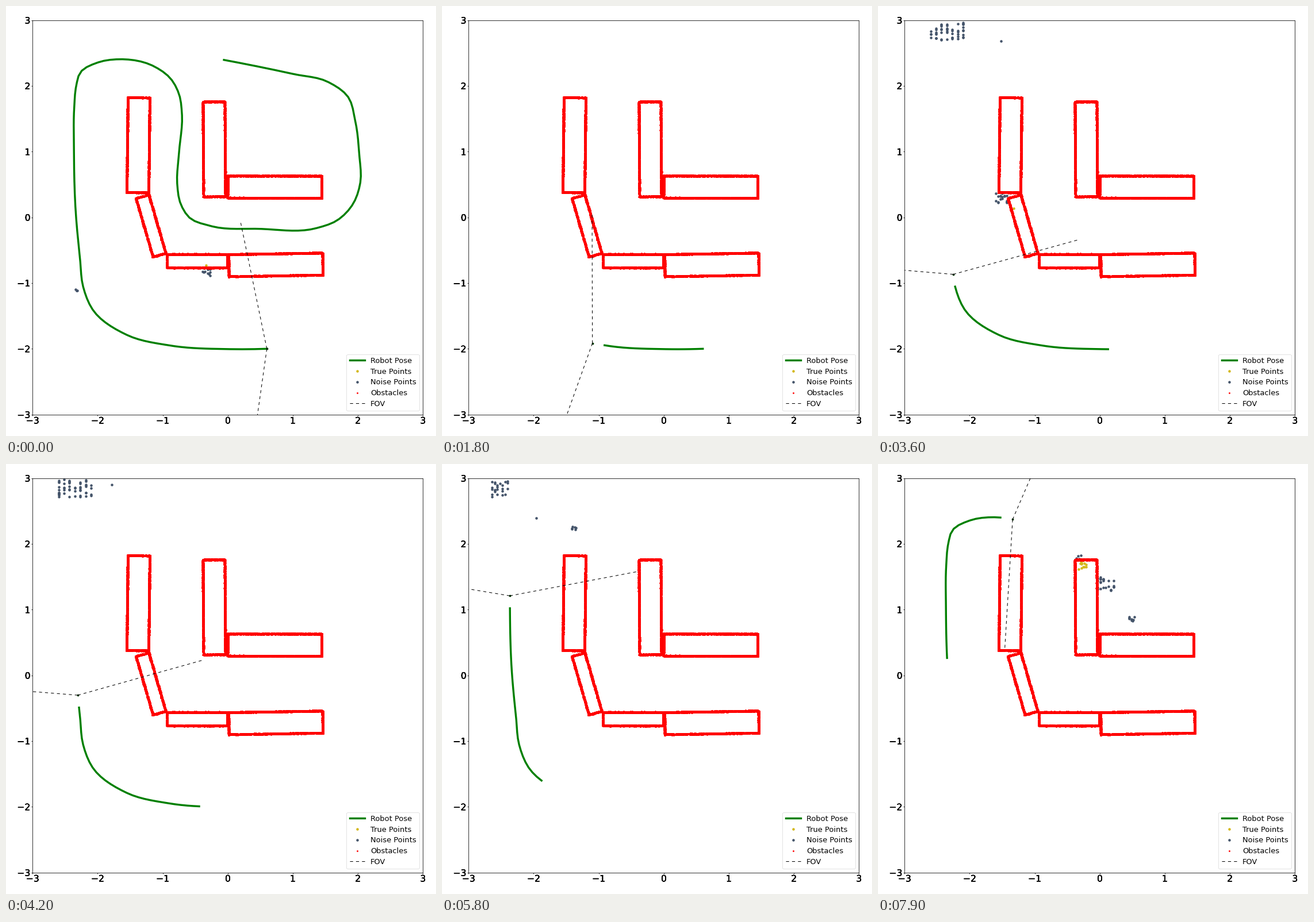
A matplotlib script that plays this animation: 748x748 px, repeating every 8000 ms.

```python
import numpy as np
import matplotlib.pyplot as plt
from matplotlib.animation import FuncAnimation
from matplotlib.patheffects import Normal

SIZE, DPI, FRAMES, STEP_MS = 748, 88, 80, 100
LEFT, RIGHT, TOP, BOTTOM = 46.3, 725.4, 24.6, 710.6
TRAIL, REACH, HALF_FOV = 31, 2.0, np.radians(80)
STRIDE = 0.0946
YELLOW, SLATE = "#d3b81a", "#44546a"

ROUTE = np.array([
    (.60, -2), (0, -2.005), (-.89, -1.95), (-1.55, -1.79), (-2.08, -1.40),
    (-2.225, -1.05), (-2.27, -.65), (-2.34, .12), (-2.365, 1.05),
    (-2.36, 1.68), (-2.33, 2), (-2.27, 2.2), (-2, 2.355), (-1.67, 2.405),
    (-1.14, 2.3), (-.87, 2.1), (-.75, 1.875), (-.705, 1.57), (-.75, .98),
    (-.777, .5), (-.725, .205), (-.59, -.005), (-.27, -.13), (.48, -.175),
    (1.36, -.165), (1.69, -.04), (1.925, .205), (2.035, .52), (2.02, .96),
    (1.96, 1.46), (1.85, 1.83), (1.54, 2.06), (1.01, 2.18), (-.06, 2.395)])

# Blocks: centre and angle of the long axis
LONG, SHORT = (1.444, .336), (.928, .205)
BLOCKS = [(LONG, -1.377, 1.101, 89.3), (LONG, -.211, 1.038, 90.35),
          (LONG, .72, .463, -.1), (LONG, .735, -.72, .95),
          (SHORT, -1.184, -.127, 106.3), (SHORT, -.472, -.664, 0)]

# Echo clusters: first step, last step, centre, radius
NOISE = [(0, 4, -.33, -.83, .06), (0, 9, -2.33, -1.1, .02),
         (20, 28, -1.6, .7, .03), (29, 42, -2.35, 2.84, .25),
         (43, 53, -2.5, 2.85, .16), (54, 64, -2.52, 2.83, .12),
         (65, 73, -2.12, 2.88, .12), (30, 41, -1.53, .28, .1),
         (43, 52, -1.62, 1.45, .05), (43, 52, -1.59, .98, .06),
         (55, 62, -1.38, 2.24, .03), (65, 74, -.64, 2.84, .07),
         (65, 74, .5, 2.78, .07), (75, 79, .09, 1.38, .12),
         (75, 79, .49, .85, .04), (75, 79, -.33, 1.79, .04)]
TRUE = [(0, 4, -.33, -.73, .005), (30, 41, -1.32, .13, .005),
        (43, 52, -1.3, 1.48, .09), (43, 52, -1.51, 1.06, .05),
        (75, 79, -.28, 1.68, .07)]


def px(v):
    """Stage pixels to points."""
    return v * 72 / DPI


def arc_length(points):
    return np.r_[0, np.cumsum(np.hypot(*np.diff(points, axis=0).T))]


def smooth(points, n=30):
    """Cubic Hermite curve through the points."""
    t = arc_length(points)
    slope = np.gradient(points, t, axis=0, edge_order=2)
    u = np.linspace(0, 1, n, endpoint=False)[:, None]
    parts = []
    for k, h in enumerate(np.diff(t)):
        parts.append((1 + 2 * u) * (1 - u) ** 2 * points[k]
                     + u * (1 - u) ** 2 * h * slope[k]
                     + u * u * (3 - 2 * u) * points[k + 1]
                     + u * u * (u - 1) * h * slope[k + 1])
    return np.vstack(parts + [points[-1:]])


def drive():
    """Poses at constant speed and their headings."""
    curve = smooth(ROUTE)
    s = arc_length(curve)
    at = np.arange(0, s[-1] + 2 * STRIDE, STRIDE)
    poses = np.column_stack([np.interp(at, s, axis) for axis in curve.T])
    dx, dy = np.gradient(poses, axis=0).T
    return poses, np.arctan2(dy, dx)


def block_dots():
    rng = np.random.default_rng(3)
    outline = np.array([(-1, -1), (1, -1), (1, 1), (-1, 1), (-1, -1)]) / 2
    dots = []
    for size, x, y, angle in BLOCKS:
        c, s = np.cos(np.radians(angle)), np.sin(np.radians(angle))
        corners = outline * size @ np.array([(c, s), (-s, c)]) + (x, y)
        for a, b in zip(corners, corners[1:]):
            t = np.linspace(0, 1, int(np.hypot(*(b - a)) * 900))[:, None]
            dots.append(a + (b - a) * t
                        + rng.uniform(-.0115, .0115, (len(t), 2)))
    return np.vstack(dots)


def echoes(clusters, step, rng):
    """Small columns of dots around every cluster seen at this step."""
    dots = [np.empty((0, 2))]
    for first, last, x, y, r in clusters:
        if first <= step <= last:
            n = int(np.ceil(200 * r))
            height = min(r, .14)
            dots.append(np.column_stack([
                x + r * rng.integers(-3, 4, n) / 3,
                y + rng.uniform(-height, height, n)]))
    return np.vstack(dots)


def strays(step, rng):
    n = rng.integers(0, 5) if step > 28 else 0
    return np.column_stack([rng.uniform(-2.5, 2, n), rng.uniform(1.6, 3, n)])


poses, heading = drive()

fig = plt.figure(figsize=(SIZE / DPI, SIZE / DPI), dpi=DPI, facecolor="white")
ax = fig.add_axes([LEFT / SIZE, 1 - BOTTOM / SIZE,
                   (RIGHT - LEFT) / SIZE, (BOTTOM - TOP) / SIZE])
ax.set(xlim=(-3, 3), ylim=(-3, 3), xticks=range(-3, 4), yticks=range(-3, 4))
ax.tick_params(length=px(1.9), width=px(0.8), pad=px(1.9), labelsize=px(15.7))
for label in ax.get_xticklabels() + ax.get_yticklabels():
    label.set_path_effects([Normal()] * 4)
for spine in ax.spines.values():
    spine.set_linewidth(px(0.8))


def dot_layer(color, size, label=None, z=1.0):
    return ax.plot([], [], "o", color=color, ms=px(size), mew=0,
                   label=label, zorder=z)[0]


trail, = ax.plot([], [], color="green", lw=px(3.4), label="Robot Pose",
                 zorder=2)
true_dots = dot_layer(YELLOW, 4.5, "True Points")
noise_dots = dot_layer(SLATE, 4.5, "Noise Points", 1.1)
blocks = dot_layer("red", 2.9, "Obstacles", 1.2)
blocks.set_data(*block_dots().T)
fov = [ax.plot([], [], color="black", lw=px(1.04), ls=(0, (5, 5)),
               label=name, zorder=3)[0] for name in ("FOV", None)]
robot = dot_layer("#003c00", 3.8, z=2.5)

legend = ax.legend(loc="lower right", fontsize=px(13), labelspacing=0.44)
legend.get_frame().set_linewidth(px(0.7))
legend.set_zorder(5)


def update(i):
    # The slice end of -1 at the first step shows the whole route
    trail.set_data(*poses[max(0, i - TRAIL):i - 1].T)
    x, y = poses[i]
    robot.set_data([x], [y])
    for line, side in zip(fov, (-HALF_FOV, HALF_FOV)):
        a = heading[i] + side
        line.set_data([x, x + REACH * np.cos(a)], [y, y + REACH * np.sin(a)])
    rng = np.random.default_rng(i + 7)
    noise = np.vstack([echoes(NOISE, i, rng), strays(i, rng)])
    noise_dots.set_data(*noise.T)
    true_dots.set_data(*echoes(TRUE, i, rng).T)
    return trail, robot, noise_dots, true_dots, *fov


anim = FuncAnimation(fig, update, frames=FRAMES, interval=STEP_MS,
                     init_func=lambda: update(0), repeat=True, repeat_delay=0,
                     blit=False)
plt.show()
```
